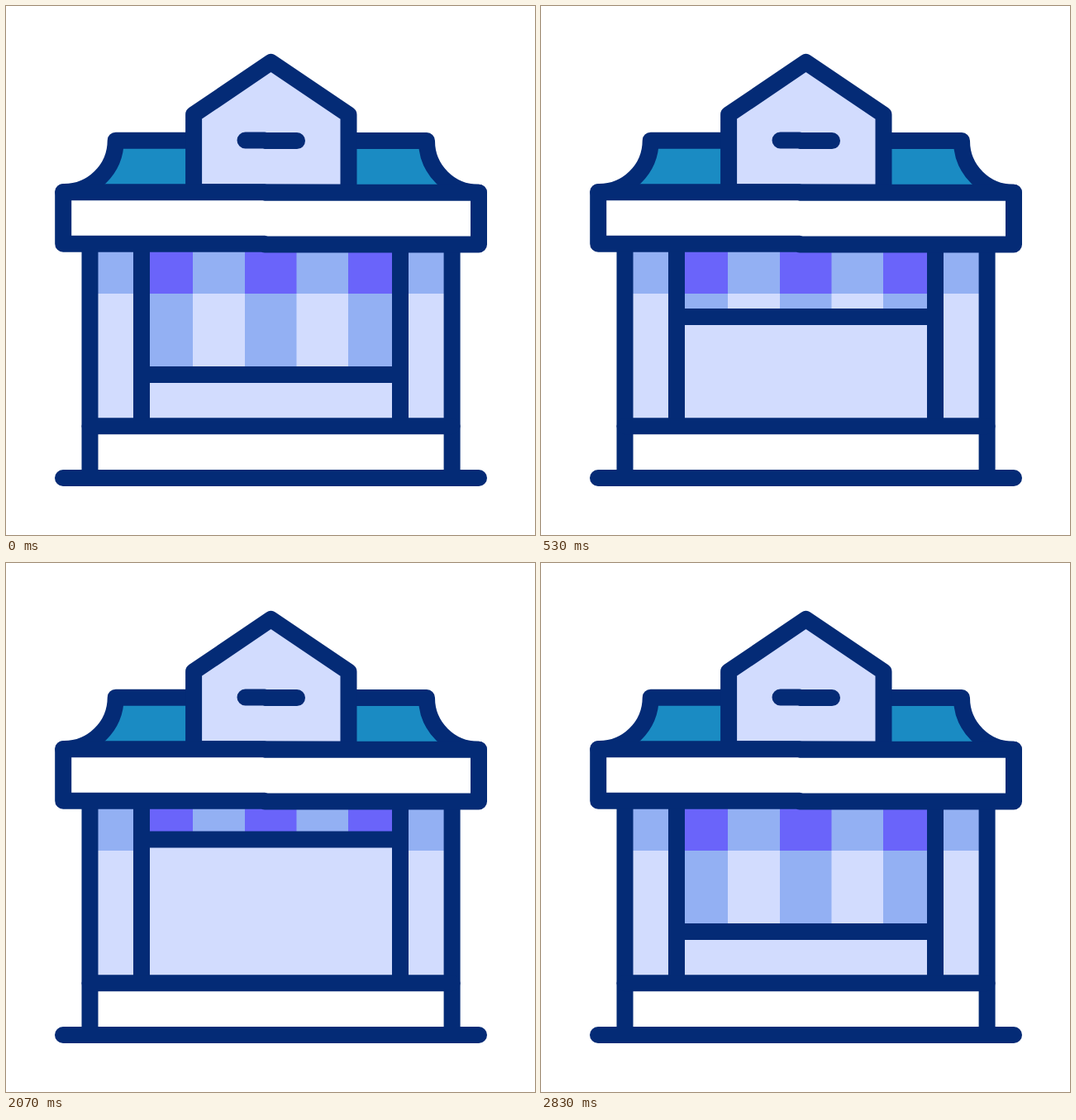
An HTML page that plays this animation: 640 px wide and 640 px high, repeating every 4000 ms.

```html
<!DOCTYPE html>
<html lang="en">
<head>
<meta charset="utf-8">
<title>Shop shutter</title>
<style>
html, body { margin: 0; width: 100%; height: 100%; overflow: hidden; background: #fff; }
svg { display: block; width: 100%; height: 100%; }
.line { fill: none; stroke: #042b76; stroke-width: 20; stroke-linecap: round; stroke-linejoin: round; }
.butt { stroke-linecap: butt; }
.pale { fill: #d2dcfe; }
.sky { fill: #93b0f3; }
.violet { fill: #6a64fa; }
.teal { fill: #1a8bc3; }
.white { fill: #fff; }
</style>
</head>
<body>
<svg viewBox="0 0 640 640">
  <defs>
    <clipPath id="cut"><rect id="cutBox" x="164" y="288" width="313" height="158"/></clipPath>
  </defs>

  <!-- windows -->
  <path class="pale" d="M102 288H540V508H102Z"/>
  <path class="sky" d="M102 288H164V348H102ZM477 288H540V348H477Z"/>

  <!-- awning and its rail -->
  <g clip-path="url(#cut)">
    <path class="sky" d="M174 288H467V348H174ZM174 348H226V472H174ZM289 348H351.500V472H289ZM414 348H467V472H414Z"/>
    <path class="violet" d="M174 288H226V348H174ZM289 288H351.500V348H289ZM414 288H467V348H414Z"/>
  </g>
  <path id="rail" class="line butt" d="M170 0H471"/>

  <!-- posts, sill and ground -->
  <path class="line butt" d="M101.500 288V571M539.600 288V571M164 288V518M477 288V518"/>
  <path class="line" d="M101.500 508.200H539.600M69 571H572"/>

  <!-- roof -->
  <path class="teal" d="M132.500 163H227V225H69.500A62.500 62.500 0 0 0 132.500 163ZM509.500 163H415V225H572A62.500 62.500 0 0 1 509.500 163Z"/>
  <path class="line" d="M227 162.700H132.700A62.500 62.500 0 0 1 69.200 225M415 163H509A62.500 62.500 0 0 0 572 225.700"/>
  <path class="line pale" style="fill:#d2dcfe" d="M227.100 225.300V131.300L320.500 68L414.500 131.500V225.700Z"/>
  <path class="line" d="M289.500 162.500H313V163.100H352"/>
  <path class="line" style="fill:#fff" d="M69.200 225.200H313V225.700H572V288.500H313V287.800H69.200Z"/>
</svg>
<script>
const LOOP = 4000, STEP = 100 / 3;
const rail = document.getElementById('rail');
const cutBox = document.getElementById('cutBox');

// [step, rail height]
const keys = [
  [0, 446], [6, 462], [12, 447.5], [16, 376], [19, 308], [22, 333], [25, 340], [28, 334], [32, 335.3],
  [61, 335.3], [65, 330], [71, 462], [74, 411], [76, 427], [78, 452], [81, 443], [85, 446]
];

const slope = i => (keys[i + 1][1] - keys[i][1]) / (keys[i + 1][0] - keys[i][0]);

// Tangents vanish at turning points, so the rail never passes a key height.
function tangent(i) {
  if (i === 0 || i === keys.length - 1) return 0;
  const a = slope(i - 1), b = slope(i);
  return a * b > 0 ? 2 * a * b / (a + b) : 0;
}

function railY(n) {
  const last = keys.length - 1;
  if (n >= keys[last][0]) return keys[last][1];
  let i = 0;
  while (n >= keys[i + 1][0]) i++;
  const [x0, y0] = keys[i], [x1, y1] = keys[i + 1];
  const w = x1 - x0, u = (n - x0) / w, v = 1 - u;
  return y0 * v * v * (1 + 2 * u) + y1 * u * u * (3 - 2 * u)
    + w * u * v * (tangent(i) * v - tangent(i + 1) * u);
}

function draw(ms) {
  const y = railY(Math.floor((ms % LOOP + 5) / STEP));
  rail.setAttribute('transform', `translate(0 ${y.toFixed(2)})`);
  cutBox.setAttribute('height', (y - 288).toFixed(2));
}

const start = performance.now();
function tick() {
  draw(performance.now() - start);
  requestAnimationFrame(tick);
}
tick();
</script>
</body>
</html>
```
